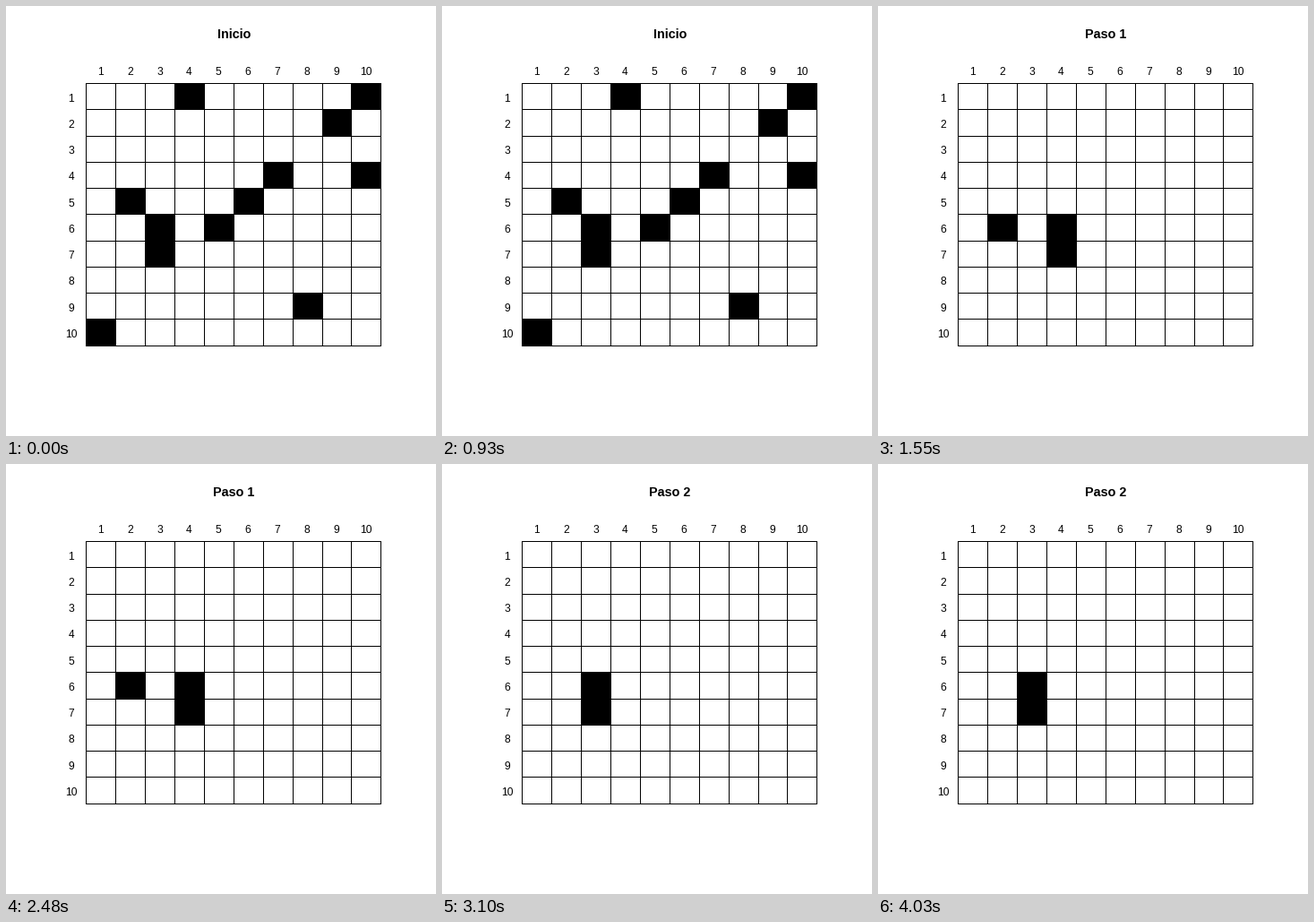
Recreate the animation shown at these times as a matplotlib script. Size 480 px wide and 480 px high, loop 4.65 s.

```python
import numpy as np
import matplotlib.pyplot as plt
from matplotlib.animation import FuncAnimation
from matplotlib.patches import Rectangle

SIZE, DPI = 480, 100
N = 10
STEP_MS = 1550
FONT = "Liberation Sans"
PX = 72 / DPI  # points per pixel

DX, DY = 32.889, 29.253
XS = np.floor(89.96 + DX * np.arange(N + 1))
YS = np.floor(86.54 + DY * np.arange(N + 1))

# Live cells at the start, as (row, column) counted from 1
START = [(1, 4), (1, 10), (2, 9), (4, 7), (4, 10), (5, 2), (5, 6),
         (6, 3), (6, 5), (7, 3), (9, 8), (10, 1)]


def evolve(grid):
    """A cell is alive when exactly three of its neighbours were."""
    p = np.pad(grid, 1)
    around = sum(p[r:r + N, c:c + N]
                 for r in range(3) for c in range(3)) - grid
    return (around == 3).astype(int)


first = np.zeros((N, N), int)
for row, col in START:
    first[row - 1, col - 1] = 1
states = [first]
for _ in range(2):
    states.append(evolve(states[-1]))

fig = plt.figure(figsize=(SIZE / DPI, SIZE / DPI), dpi=DPI, facecolor="white")
ax = fig.add_axes([0, 0, 1, 1])
ax.set_xlim(0, SIZE)
ax.set_ylim(SIZE, 0)
ax.axis("off")


def label(x, y, text, size, **kw):
    return ax.text(x, y, text, fontsize=size * PX, family=FONT,
                   color="black", ha="center", va="baseline", **kw)


def line(x, y):
    # Snapping puts whole coordinates on the pixel that starts there
    ax.plot(x, y, color="black", lw=PX, solid_capstyle="projecting",
            snap=True, zorder=3)


for x in XS:
    line([x, x], [YS[0], YS[-1]])
for y in YS:
    line([XS[0], XS[-1]], [y, y])

for i in range(N):
    label(105.7 + DX * i, 77, str(i + 1), 12)
    label(72.7, np.floor(101.16 + DY * i) + 6, str(i + 1), 12)

title = label(254.5, 36, "", 14.4, weight="bold")

cells = [[ax.add_patch(Rectangle((XS[c], YS[r]), XS[c + 1] - XS[c],
                                 YS[r + 1] - YS[r], fc="black", lw=0,
                                 visible=False))
          for c in range(N)] for r in range(N)]


def draw(frame):
    title.set_text(f"Paso {frame}" if frame else "Inicio")
    for r in range(N):
        for c in range(N):
            cells[r][c].set_visible(bool(states[frame][r, c]))
    return [title]


anim = FuncAnimation(fig, draw, frames=len(states), interval=STEP_MS,
                     init_func=lambda: draw(0), repeat=True, repeat_delay=0)
plt.show()
```
